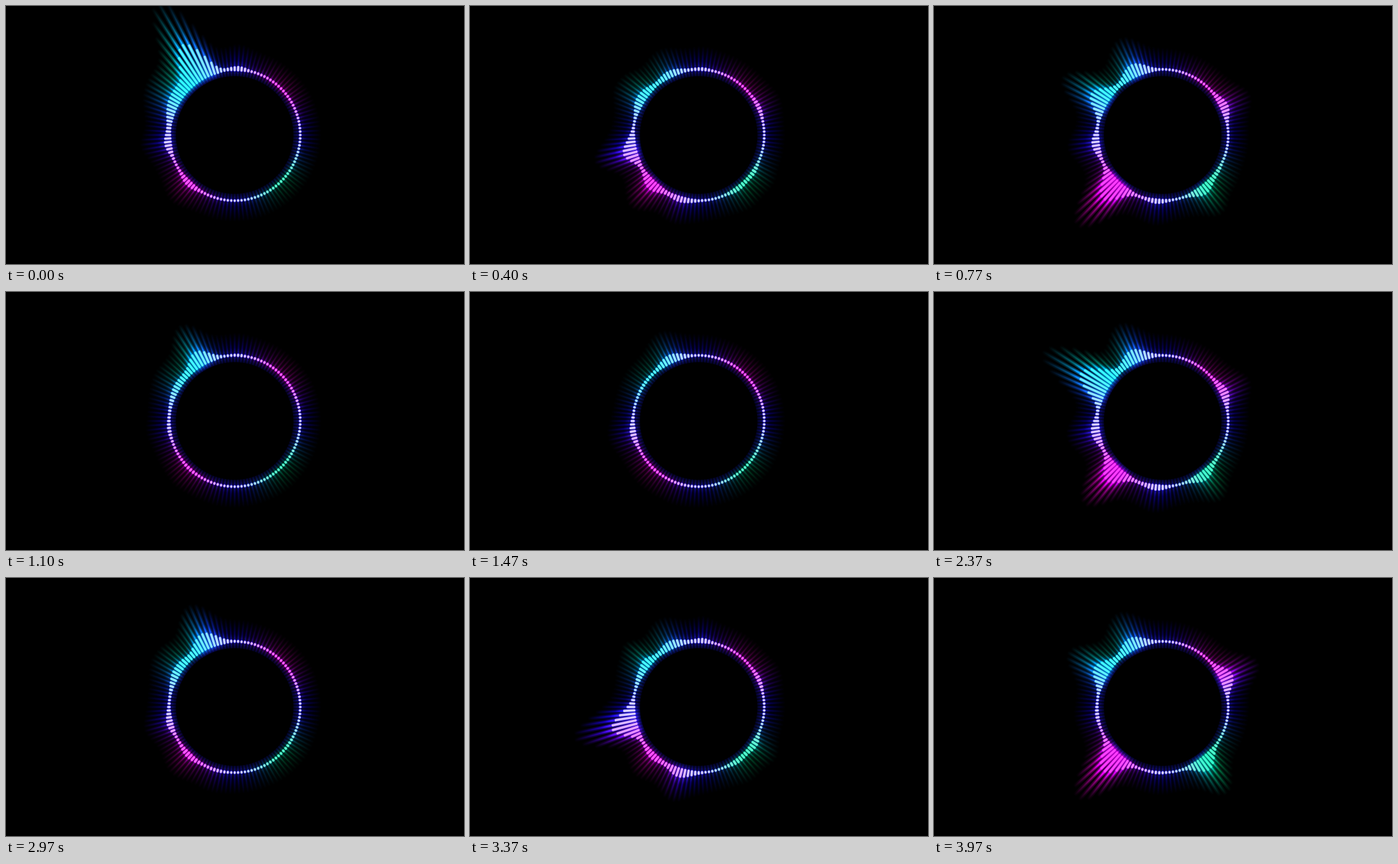
Animation of 718 by 404 pixels, one loop 4010 ms. Source, as an HTML page with a canvas:

```html
<!DOCTYPE html>
<html lang="en">
<head>
<meta charset="utf-8">
<title>Ring visualizer</title>
<style>
  html, body { margin: 0; width: 100%; height: 100%; overflow: hidden; background: #000; }
  canvas { display: block; }
</style>
</head>
<body>
<canvas id="stage" width="718" height="404"></canvas>
<script>
const ctx = document.getElementById('stage').getContext('2d');
const LOOP = 4010, BARS = 120, RADIUS = 103, CX = 358.5, CY = 202;

// Each band is a hump on the ring: [degrees clockwise from the top, spread]
const BANDS = [
  [336, 8.5], [300, 7.5], [263, 7], [223.5, 7.5], [185, 7], [143, 7.5],
  [65, 7.5], [330, 7.5], [302, 14], [254.5, 6], [311, 5], [3, 6],
  [197, 7], [124, 6]
];

// Bar length per band for each kind of sound
const SOUNDS = {
  kick:   [0, 0, 7, 5, 0, 0, 0, 58, 14, 0, 2, 4],
  snare:  [17, 26, 8, 34, 4, 11, 9, 0, 0, 0, 0, 0, 0, 2],
  hush:   [9, 1, 4, 1],
  chord:  [17, 45, 8, 25, 5, 11, 9, 0, 0, 0, 4],
  pluck:  [21, 5, 2, 5, 0, 0, 0, 0, 3, 0, 3],
  voice:  [9, 4, 13, 4, 2, 4, 3, 0, 0, 30, 8, 4, 10, 6],
  accent: [12, 19, 2, 34, 1, 19, 17]
};

const CUES = [
  [0, 'kick', 1], [250, 'snare', 1.3], [430, 'voice', .8],
  [770, 'snare', 1], [990, 'kick', .92], [1200, 'voice', .95],
  [1470, 'hush', 1], [1600, 'chord', .9], [1760, 'accent', 1.15],
  [1930, 'kick', .94], [2120, 'voice', 1.15], [2370, 'chord', 1],
  [2560, 'kick', .94], [2750, 'voice', 1.2], [2970, 'pluck', 1],
  [3140, 'snare', 1.5], [3370, 'voice', 1], [3550, 'accent', 1.4],
  [3710, 'kick', .85], [3850, 'chord', .9], [3970, 'accent', 1]
];

const ATTACK = 80, DECAY = 110;

function envelope(dt) {
  if (dt < 0) return Math.max(0, 1 + dt / ATTACK);
  return Math.exp(-dt / DECAY);
}

function levelsAt(time) {
  return BANDS.map((_, band) => Math.max(...CUES.map(([start, sound, gain]) =>
    (SOUNDS[sound][band] || 0) * gain * envelope(time - start))));
}

function barLength(deg, levels) {
  return BANDS.reduce((sum, [center, spread], i) => {
    const gap = Math.abs(deg - center), d = Math.min(gap, 360 - gap) / spread;
    return sum + levels[i] * Math.exp(-d * d / 2);
  }, 0);
}

const rgba = (r, g, b, a = 1) => `rgba(${r | 0},${g | 0},${b | 0},${a})`;

// Magenta and green sectors alternate between the blue axes; the lower green one is teal.
// Long bars are more saturated than short ones.
function palette(deg, length) {
  const s = Math.sin(deg * Math.PI / 90), weight = s * s;
  const m = s > 0 ? weight : 0, g = s < 0 ? weight : 0, teal = deg < 180 ? g : 0;
  const vivid = .75 + .25 * Math.min(1, length / 15);
  return {
    core: rgba(215 + 40 * m - 165 * g * vivid, 210 - 150 * m * vivid + 45 * g, 255 - 50 * teal),
    glow: a => rgba(40 + 170 * m - 40 * g, 30 - 30 * m + 140 * g, 255 - 25 * m - 30 * g - 85 * teal, a),
    fringe: a => rgba(10 + 130 * m - 10 * g, 120 * g, 180 - 60 * m - 80 * g - 30 * teal, a)
  };
}

function stroke(style, width, from, to, cap) {
  ctx.strokeStyle = style;
  ctx.lineWidth = width;
  ctx.lineCap = cap;
  ctx.beginPath();
  ctx.moveTo(0, -from);
  ctx.lineTo(0, -to);
  ctx.stroke();
}

function drawGlow(length, { glow, fringe }) {
  const inner = 92, tip = RADIUS + length, outer = tip + 33 + length * .8;
  const strength = .42 + .4 * Math.min(1, length / 18);
  const at = r => (r - inner) / (outer - inner);
  const fade = ctx.createLinearGradient(0, -inner, 0, -outer);
  fade.addColorStop(0, rgba(20, 20, 255, .12));
  fade.addColorStop(at(RADIUS - 3), glow(strength * .8));
  fade.addColorStop(at(tip), glow(strength));
  fade.addColorStop(at(tip + (outer - tip) * .3), fringe(strength * .75));
  fade.addColorStop(at(tip + (outer - tip) * .6), fringe(strength * .4));
  fade.addColorStop(1, fringe(0));
  stroke(fade, 2.6, inner, outer, 'butt');
  ctx.globalAlpha = .3 + .4 * Math.min(1, length / 18);
  stroke(fade, 6.4, inner, outer, 'butt');
  ctx.globalAlpha = 1;
}

function eachBar(levels, draw) {
  for (let i = 0; i < BARS; i++) {
    const deg = i * 360 / BARS, length = barLength(deg, levels);
    ctx.save();
    ctx.translate(CX, CY);
    ctx.rotate(deg * Math.PI / 180);
    draw(length, palette(deg, length));
    ctx.restore();
  }
}

function render(time) {
  const levels = levelsAt(time);
  ctx.globalCompositeOperation = 'source-over';
  ctx.fillStyle = '#000';
  ctx.fillRect(0, 0, 718, 404);
  ctx.globalCompositeOperation = 'lighter';
  eachBar(levels, drawGlow);
  ctx.globalCompositeOperation = 'source-over';
  eachBar(levels, (length, { core, glow }) => {
    const from = RADIUS - .5 - Math.min(1.5, length / 4);
    const end = RADIUS + Math.max(.1, length - .5);
    stroke(glow(.6), 5, from, end, 'round');
    stroke(core, 3.6, from, end, 'round');
  });
}

// The picture steps 30 times a second; the first one is held twice as long
function stepTime(t) {
  const step = Math.floor((t + 4) * .03);
  return step < 2 ? 0 : Math.min(3970, Math.round(step * 10 / 3) * 10);
}

const begin = performance.now();
let shown = -1;
function tick() {
  const time = stepTime((performance.now() - begin) % LOOP);
  if (time !== shown) render(shown = time);
  requestAnimationFrame(tick);
}
tick();
</script>
</body>
</html>
```
